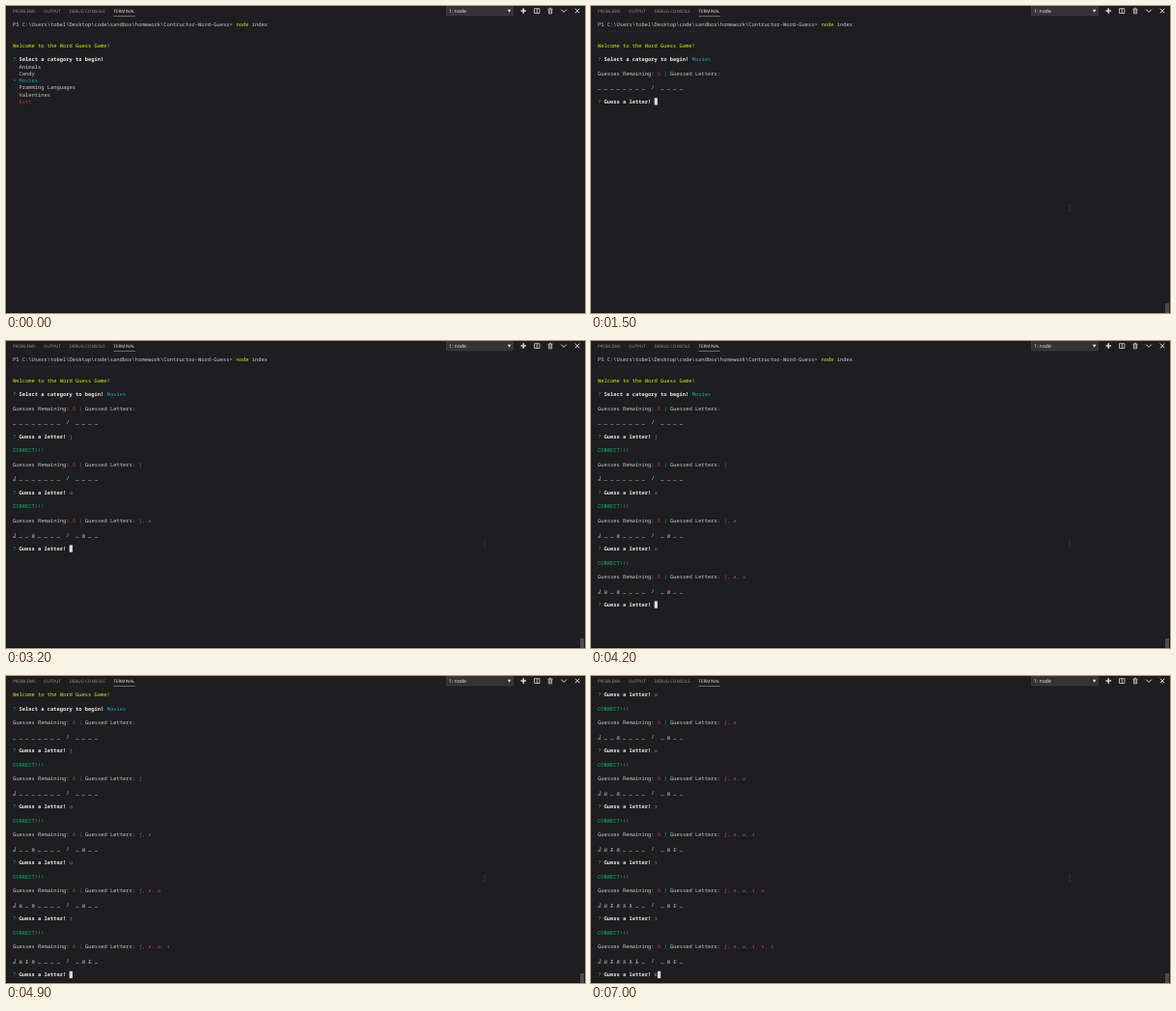
Animation of 600x318 px, one loop 7.1 s. Source, as an HTML page:

```html
<!DOCTYPE html>
<html lang="en">
<head>
<meta charset="utf-8">
<title>Word guess terminal</title>
<style>
  html, body { margin: 0; width: 100%; height: 100%; overflow: hidden; background: #1e1d1f; }
  svg { display: block; width: 600px; height: 318px; }
  text { white-space: pre; text-rendering: geometricPrecision; }
  #screen { font: 5.433px "Noto Sans Mono", "DejaVu Sans Mono", monospace; fill: #cccccc; }
  #tabs { font: 4.55px "Open Sans", "Noto Sans", sans-serif; fill: #969696; }
  #icons { fill: none; stroke: #d8d8d8; stroke-width: 1; }
  #screen .bold { font-weight: 700; fill: #e8e8e8; }
  #screen .yellow { fill: #e5e510; }
  #screen .green { fill: #0dbc79; }
  #screen .cyan { fill: #11a8cd; }
  #screen .blue { fill: #2e86c8; }
  #screen .red { fill: #cd3131; }
  #screen .magenta { fill: #b03cb0; }
  #screen .dim { fill: #4a4a4a; }
</style>
</head>
<body>
<svg viewBox="0 0 600 318">
  <rect width="600" height="318" fill="#1e1d1f"/>
  <rect y="317" width="600" height="1" fill="#171518"/>
  <g id="tabs">
    <text x="7" y="6.7">PROBLEMS</text>
    <text x="39" y="6.7">OUTPUT</text>
    <text x="65.5" y="6.7">DEBUG CONSOLE</text>
    <text x="111.5" y="6.7" fill="#e7e7e7">TERMINAL</text>
    <rect x="111.5" y="10" width="22.5" height="0.6" fill="#a0a0a0"/>
    <rect x="456.3" y="0.3" width="69" height="9.6" fill="#343335" stroke="#454446" stroke-width="0.6"/>
    <text x="459" y="7" font-size="5.1" fill="#f0f0f0">1: node</text>
    <path d="M519.8 3.7h3.6l-1.8 3z" fill="#e8e8e8"/>
  </g>
  <g id="icons">
    <path d="M533.5 5h5.4M536.2 2.3v5.4" stroke-width="1.5"/>
    <path d="M547.5 2.7h5.4v4.8h-5.4zM550.2 2.7v4.8" stroke-width="0.8"/>
    <path d="M561.5 3.2h5M563 2.3h2M562.4 3.4v4.4h3.2v-4.4M564 4v3" stroke-width="0.8"/>
    <path d="M575.3 3.6l2.8 2.8l2.8 -2.8"/>
    <path d="M589.8 2.6l4.6 4.6m0 -4.6l-4.6 4.6"/>
  </g>
  <g id="screen"></g>
  <path id="pointer" d="M494.8 206.2h2.4M496 206.2v6M494.8 212.2h2.4" stroke="#3e3d40" stroke-width="0.6" fill="none"/>
  <rect id="thumb" x="595" y="308" width="4" height="10" fill="#4b4a4c"/>
</svg>
<script>
const LOOP = 7100, CHOSEN = 900, THUMB = 100;
const LEFT = 7, CELL = 3.26, BASE = 21, LINE = 7.26, ROWS = 41;

const guesses = [
  { letter: 'j', typed: 2400, sent: 2600 },
  { letter: 'a', typed: 2900, sent: 3100 },
  { letter: 'u', typed: 3900, sent: 4100 },
  { letter: 'r', typed: 4700, sent: 4900 },
  { letter: 's', typed: 5200, sent: 5400 },
  { letter: 'i', typed: 6100, sent: 6300 },
  { letter: 'c', typed: 6900, sent: Infinity }
];
const menu = ['Animals', 'Candy', 'Movies', 'Pramming Languages', 'Valentines', 'Exit'];
const answer = ['Jurassi_', '_ar_'];

const byId = id => document.getElementById(id);
const screen = byId('screen');
let scroll = 0;

function add(tag, attrs, text) {
  const node = document.createElementNS('http://www.w3.org/2000/svg', tag);
  for (const name in attrs) node.setAttribute(name, attrs[name]);
  if (text) node.textContent = text;
  screen.append(node);
}

function put(row, col, text, style = '') {
  if (row < scroll) return;
  add('text', { x: LEFT + col * CELL, y: BASE + (row - scroll) * LINE, class: style }, text);
}

function block(row, col) {
  add('rect', {
    x: LEFT + col * CELL, y: BASE + (row - scroll) * LINE - 5.6,
    width: CELL, height: LINE, fill: '#dcdcdc'
  });
}

function ask(row, question) {
  put(row, 0, '?', 'green');
  put(row, 2, question, 'bold');
}

function drawWord(row, known) {
  let col = 0;
  answer.forEach((part, i) => {
    if (i) {
      put(row, col + 1, '/');
      col += 4;
    }
    for (const ch of part) {
      put(row, col, '_');
      if (known.includes(ch.toLowerCase())) put(row, col, ch);
      col += 2;
    }
  });
}

function drawMenu() {
  ask(5, 'Select a category to begin!');
  menu.forEach((name, i) => {
    const style = name === 'Movies' ? 'cyan' : name === 'Exit' ? 'red' : '';
    put(6 + i, 2, name, style);
    if (style === 'cyan') put(6 + i, 0, '>', style);
  });
}

// Each turn fills eight rows, from the status line to the verdict.
function drawTurn(turn, sent, typed) {
  const row = 7 + turn * 8;
  const known = guesses.slice(0, turn).map(g => g.letter);
  put(row, 0, 'Guesses Remaining:');
  put(row, 19, '6', 'red');
  put(row, 21, '|', 'blue');
  put(row, 23, 'Guessed Letters:');
  if (turn) put(row, 40, known.join(', '), 'magenta');
  drawWord(row + 2, known);
  ask(row + 4, 'Guess a letter!');
  const done = turn < sent;
  if (turn < typed) put(row + 4, 18, guesses[turn].letter, done ? 'cyan' : '');
  if (done) put(row + 6, 0, 'CORRECT!!!', 'green');
  else block(row + 4, turn < typed ? 19 : 18);
}

function draw(chosen, sent, typed) {
  screen.replaceChildren();
  scroll = Math.max(0, 11 + sent * 8 - ROWS + 1);
  put(0, 0, 'PS C:\\Users\\tobel\\Desktop\\code\\sandbox\\homework\\Contructor-Word-Guess>');
  put(0, 71, 'node', 'yellow');
  put(0, 76, 'index');
  put(3, 0, 'Welcome to the Word Guess Game!', 'yellow');
  if (!chosen) return drawMenu();
  put(1, 0, '-'.repeat(34), 'dim');
  ask(5, 'Select a category to begin!');
  put(5, 30, 'Movies', 'cyan');
  for (let turn = 0; turn <= sent; turn++) drawTurn(turn, sent, typed);
}

const start = performance.now();
let shown = '';

function tick() {
  const t = (performance.now() - start) % LOOP;
  const chosen = t >= CHOSEN;
  const sent = guesses.filter(g => t >= g.sent).length;
  const typed = guesses.filter(g => t >= g.typed).length;
  const key = [chosen, sent, typed].join();
  if (key !== shown) {
    draw(chosen, sent, typed);
    shown = key;
  }
  byId('pointer').style.opacity = chosen ? 1 : 0;
  byId('thumb').style.opacity = t >= THUMB ? 1 : 0;
  requestAnimationFrame(tick);
}
tick();
</script>
</body>
</html>
```
